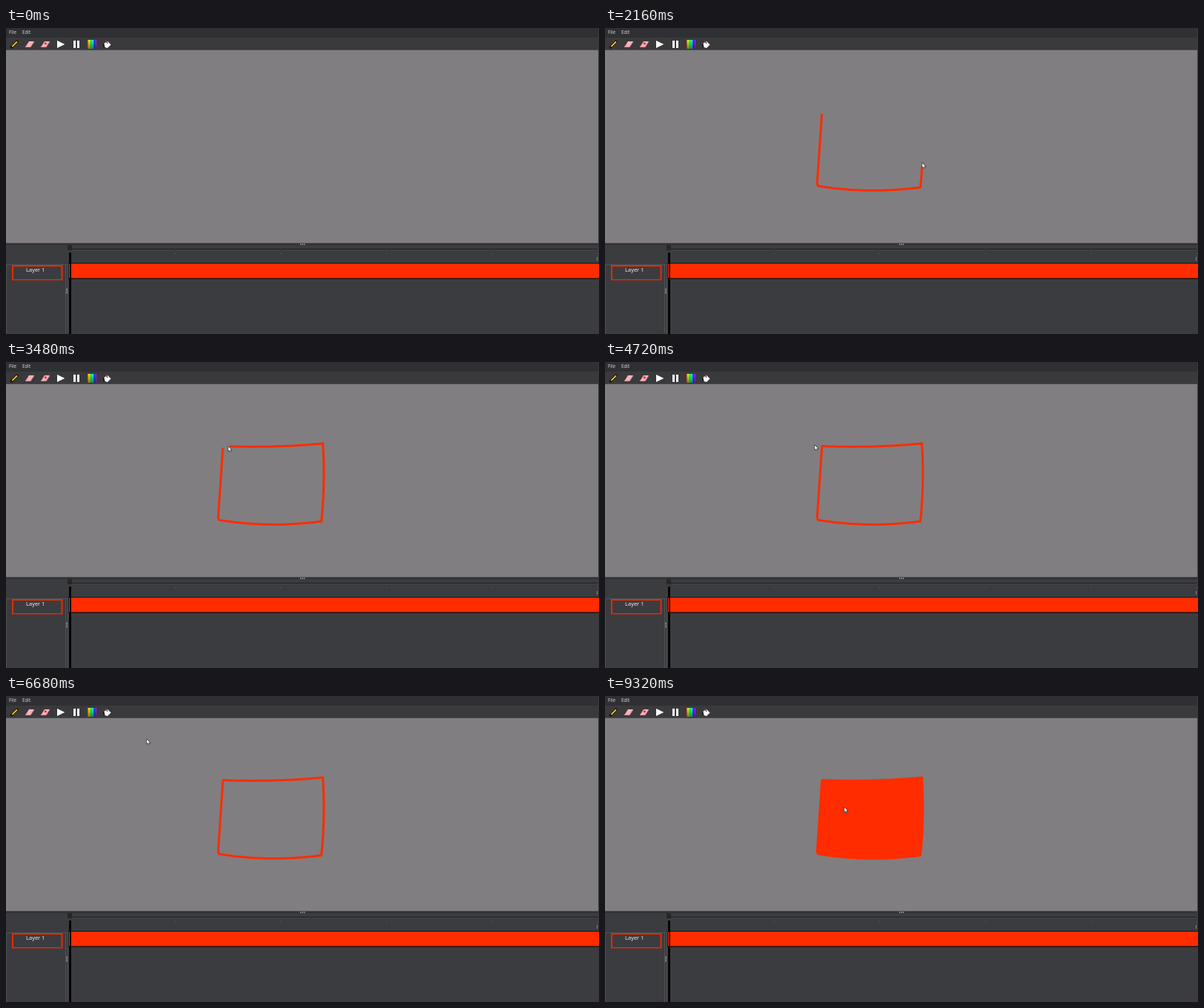
An HTML page with a canvas that plays this animation: 800 by 413 pixels, repeating every 9.36 s.

```html
<!DOCTYPE html>
<html lang="en">
<head>
<meta charset="utf-8">
<title>Drawing a box</title>
<style>
html, body { margin: 0; width: 100%; height: 100%; overflow: hidden; background: #3b3c3f; }
canvas { display: block; }
</style>
</head>
<body>
<canvas id="stage" width="800" height="413"></canvas>
<script>
const ctx = document.getElementById('stage').getContext('2d');
const LOOP = 9360, STEP = 40;
const DRAW_FROM = 1000, DRAW_TO = 3840, FILL_AT = 8040, LAG = 25;
const RED = '#ff2c00', PANEL = '#3b3c3f';

// Each side of the box is a quadratic curve, drawn at constant pace.
const side = (from, to, start, end, bendX = 0, bendY = 0) => ({
  from, to, start, end,
  mid: { x: (from.x + to.x) / 2 + bendX, y: (from.y + to.y) / 2 + bendY }
});
const topLeft = { x: 292.5, y: 117 }, bottomLeft = { x: 286, y: 213 };
const bottomRight = { x: 425.5, y: 215 }, topRight = { x: 427.5, y: 110 };
const meet = { x: 293, y: 113.5 };
const sides = [
  side(topLeft, bottomLeft, DRAW_FROM, 1555),
  side(bottomLeft, bottomRight, 1555, 2040, 0, 10.5),
  side(bottomRight, topRight, 2040, 2500, 4.4, 0),
  side(topRight, meet, 2500, 3560, 0, 4.6),
  side(meet, topLeft, 3560, DRAW_TO)
];

const stop = (time, x, y) => ({ time, x, y });
const approach = [stop(40, 12, 21), stop(840, topLeft.x, topLeft.y)];
const errands = [
  stop(DRAW_TO, topLeft.x, topLeft.y), stop(4720, 283, 112), stop(5720, 136, 22),
  stop(6280, 134, 21), stop(6680, 190, 58), stop(7200, 342, 163),
  stop(8640, 342, 163), stop(9320, 323, 150)
];

const clamp = v => Math.min(1, Math.max(0, v));
const mix = (a, b, p) => a + (b - a) * p;

function penAt(t) {
  const s = sides.find(s => t < s.end) || sides[sides.length - 1];
  const p = clamp((t - s.start) / (s.end - s.start));
  const curve = k => mix(mix(s.from[k], s.mid[k], p), mix(s.mid[k], s.to[k], p), p);
  return { x: curve('x'), y: curve('y') };
}

function travel(stops, t) {
  let i = 0;
  while (i < stops.length - 2 && stops[i + 1].time <= t) i++;
  const a = stops[i], b = stops[i + 1];
  const p = clamp((t - a.time) / (b.time - a.time));
  return { x: mix(a.x, b.x, p), y: mix(a.y, b.y, p) };
}

function rect(x, y, w, h, color) {
  ctx.fillStyle = color;
  ctx.fillRect(x, y, w, h);
}

function shape(points, fill, stroke) {
  ctx.beginPath();
  points.forEach(([x, y]) => ctx.lineTo(x, y));
  ctx.closePath();
  ctx.fillStyle = fill;
  ctx.fill();
  if (stroke) {
    ctx.strokeStyle = stroke;
    ctx.lineWidth = 0.7;
    ctx.lineJoin = 'miter';
    ctx.stroke();
  }
}

function dot(x, y, r, color) {
  ctx.fillStyle = color;
  ctx.beginPath();
  ctx.arc(x, y, r, 0, Math.PI * 2);
  ctx.fill();
}

function line(x1, y1, x2, y2, width, color) {
  ctx.strokeStyle = color;
  ctx.lineWidth = width;
  ctx.lineCap = 'butt';
  ctx.beginPath();
  ctx.moveTo(x1, y1);
  ctx.lineTo(x2, y2);
  ctx.stroke();
}

function label(text, x, y, size, color, align = 'left') {
  ctx.font = `${size}px "Noto Sans", sans-serif`;
  ctx.fillStyle = color;
  ctx.textAlign = align;
  ctx.fillText(text, x, y);
}

function eraser(x) {
  shape([[x + 5, 18], [x + 12, 18], [x + 7, 26], [x, 26]], '#f6b3ba');
  line(x + 0.5, 25.3, x + 7, 25.3, 1.4, '#ee9ca6');
  line(x + 7, 25.5, x + 11.6, 18.5, 1.2, '#dc8f9a');
}

function palette(x) {
  for (let i = 0; i < 12; i++) {
    const hue = 25 + i * 23.6;
    const shade = ctx.createLinearGradient(0, 16, 0, 28);
    shade.addColorStop(0, `hsl(${hue}, 95%, 55%)`);
    shade.addColorStop(1, `hsl(${hue}, 70%, 32%)`);
    rect(x + i, 16, 1, 12, shade);
  }
}

function toolbar() {
  rect(0, 0, 800, 13, '#2f3034');
  rect(0, 13, 800, 17, '#3a3a3d');
  rect(0, 29, 800, 1, '#48484b');
  label('File', 4, 8, 6.3, '#d0d0d0');
  label('Edit', 22, 8, 6.3, '#d0d0d0');

  line(6.5, 27, 16, 17.3, 3.4, '#15130c');
  line(8.3, 25.2, 15, 18.4, 1.7, '#ffd32e');

  eraser(26);
  eraser(47);
  dot(53.3, 21, 1.4, '#d5202c');

  shape([[69, 17], [79.3, 22], [69, 27]], '#fff');
  rect(91, 17, 3, 10, '#fff');
  rect(96, 17, 3, 10, '#fff');
  palette(110);

  shape([[132, 21], [137, 18], [141.5, 22.5], [137, 27], [133.5, 26]], '#fff');
  line(131.5, 21, 132.5, 26, 1.6, '#17171a');
  line(134.5, 16.5, 137, 21, 1.5, '#7b3c3c');
}

function timeline() {
  rect(0, 290, 800, 123, PANEL);
  rect(0, 290, 800, 1, '#4a4a4d');
  rect(0, 291, 800, 2, '#323235');
  rect(799, 0, 1, 413, '#3d3d40');
  for (let i = -1; i <= 1; i++) {
    dot(400 + i * 2.5, 292, 0.8, '#d0d0d0');
    dot(82, 355 + i * 2.5, 0.8, '#c4c4c4');
  }

  rect(83, 293, 6, 7, '#27272a');
  rect(89, 298, 709, 1, '#1e1e20');
  rect(89, 299, 709, 1, '#47484b');
  for (let i = 1; i <= 5; i++) rect(Math.round(85.5 + i * 142.4), 304, 1, 1, '#67676a');
  rect(797, 309, 1, 5, '#87878a');

  rect(0, 319, 83, 1, '#525255');
  [0, 80, 83].forEach(x => rect(x, 319, 1, 94, '#525255'));

  rect(8, 320, 68.5, 20.5, '#e22b08');
  rect(10, 322, 64.5, 17, PANEL);
  label('Layer 1', 39.7, 328.7, 7.4, '#eee', 'center');

  rect(84, 317, 716, 22, '#171315');
  rect(88, 318, 712, 19.5, RED);
  rect(85, 303, 3, 110, '#050505');
  rect(85, 318, 1, 19.5, RED);
}

function drawing(t) {
  if (t <= DRAW_FROM) return;
  ctx.beginPath();
  for (let u = DRAW_FROM; u < Math.min(t, DRAW_TO); u += 20) {
    const p = penAt(u);
    ctx.lineTo(p.x, p.y);
  }
  const tip = penAt(t);
  ctx.lineTo(tip.x, tip.y);
  ctx.fillStyle = ctx.strokeStyle = RED;
  if (t >= FILL_AT) ctx.fill();
  ctx.lineWidth = 3;
  ctx.lineCap = ctx.lineJoin = 'round';
  ctx.stroke();
}

function pointer(t) {
  if (t < STEP) return;
  const { x, y } = t < DRAW_FROM ? travel(approach, t)
    : t < DRAW_TO ? penAt(t + LAG)
    : travel(errands, t);
  ctx.save();
  ctx.translate(x - 0.3, y);
  shape([[0, 0], [0, 7], [1.6, 5.6], [2.8, 8], [4, 7.4], [2.9, 5.1], [5, 5]],
    '#fff', '#222');
  ctx.restore();
}

function render(t) {
  rect(0, 0, 800, 413, '#807e80');
  toolbar();
  timeline();
  drawing(t);
  pointer(t);
}

const start = performance.now();
function tick() {
  const t = (performance.now() - start) % LOOP;
  render(Math.floor(t / STEP) * STEP);
  requestAnimationFrame(tick);
}
tick();
</script>
</body>
</html>
```
